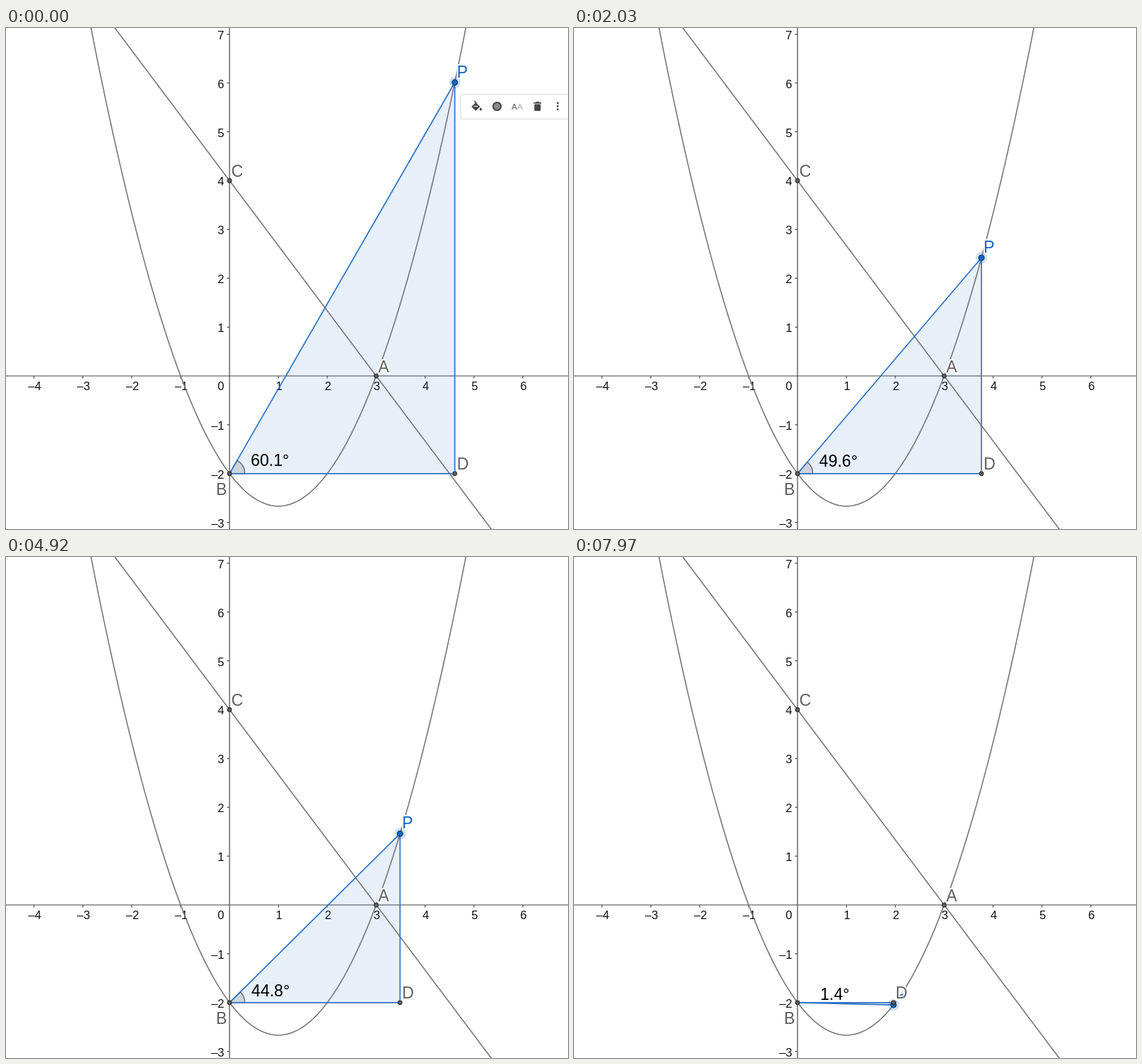
Recreate the animation shown at these times as an HTML page with a canvas. Size 792 by 707 pixels, loop 8000 ms.

```html
<!DOCTYPE html>
<html lang="en">
<head>
<meta charset="utf-8">
<title>Parabola and right triangle</title>
<style>
html, body { margin: 0; width: 100%; height: 100%; overflow: hidden; background: #fff; }
canvas { display: block; }
</style>
</head>
<body>
<canvas id="stage" width="792" height="707"></canvas>
<script>
const ctx = document.getElementById('stage').getContext('2d');
const LOOP = 8000, UNIT = 68.9, OX = 315, OY = 491;
const GREY = '#616161', BLUE = '#1565c0';
const FONT = '"Liberation Sans", Arial, sans-serif';

const sx = x => OX + x * UNIT;
const sy = y => OY - y * UNIT;
const parabola = x => 2 / 3 * (x + 1) * (x - 3);

// Drag of P: first step, last step, number of steps, x reached
const START_X = 4.608;
const DRAG = [
  [240, 960, 7, 4.208], [1070, 1200, 2, 4.1186], [1320, 1790, 5, 3.875],
  [1920, 2030, 2, 3.7625], [2160, 2510, 4, 3.617], [2650, 3450, 8, 3.474],
  [4340, 4680, 4, 3.482], [4920, 5030, 2, 3.494], [5270, 5270, 1, 3.496],
  [5540, 5540, 1, 3.498], [6150, 6150, 1, 3.479], [6260, 6880, 6, 2.818],
  [6990, 7120, 2, 2.6244], [7230, 7230, 1, 2.575], [7370, 7470, 2, 2.37],
  [7610, 7970, 4, 1.9633]
];

function dragX(t) {
  let x = START_X;
  for (const [from, to, steps, end] of DRAG) {
    if (t < from) break;
    const gap = (to - from) / (steps - 1 || 1);
    const done = t >= to ? steps : Math.floor((t - from) / gap + 0.01) + 1;
    x += (end - x) * done / steps;
  }
  return x;
}

function path(points, color, width) {
  ctx.beginPath();
  points.forEach(([x, y]) => ctx.lineTo(x, y));
  ctx.strokeStyle = color;
  ctx.lineWidth = width;
  ctx.stroke();
}

function disc(x, y, r, fill, stroke, width = 1) {
  ctx.beginPath();
  ctx.arc(x, y, r, 0, 7);
  ctx.fillStyle = fill;
  ctx.fill();
  if (!stroke) return;
  ctx.strokeStyle = stroke;
  ctx.lineWidth = width;
  ctx.stroke();
}

function text(str, x, y, size, color, align = 'left', outline = false) {
  ctx.font = `${size}px ${FONT}`;
  ctx.textAlign = align;
  if (outline) {
    ctx.strokeStyle = '#fff';
    ctx.lineWidth = 4;
    ctx.strokeText(str, x, y);
  }
  ctx.fillStyle = color;
  ctx.fillText(str, x, y);
}

const label = (str, x, y, color = GREY) => text(str, x, y, 23, color, 'left', true);
const signed = n => n < 0 ? '–' + -n : '' + n;

function drawAxes() {
  const ink = '#444';
  path([[0, OY], [792, OY]], ink, 1.2);
  path([[OX, 0], [OX, 707]], ink, 1.2);
  for (let n = -4; n <= 7; n++) {
    if (!n) continue;
    if (n < 7) {
      path([[sx(n), OY], [sx(n), OY + 3.5]], ink, 1.2);
      text(signed(n), sx(n) + 1, 511, 16.5, '#111', 'center');
    }
    if (n > -4) {
      path([[OX - 3.5, sy(n)], [OX, sy(n)]], ink, 1.2);
      text(signed(n), 307.5, sy(n) + 7, 16.5, '#111', 'right');
    }
  }
  text('0', 307.5, 511, 16.5, '#111', 'right');
}

function drawCurves() {
  const curve = [];
  for (let x = -3; x <= 5; x += 0.05) curve.push([sx(x), sy(parabola(x))]);
  path(curve, '#777', 1.6);
  path([-3, 6].map(x => [sx(x), sy(4 - 4 / 3 * x)]), '#777', 1.6);
}

function drawAngle(angle) {
  const by = sy(-2);
  ctx.beginPath();
  ctx.moveTo(OX, by);
  ctx.arc(OX, by, 21.5, 0, -angle, angle > 0);
  ctx.closePath();
  ctx.fillStyle = 'rgba(0,0,0,.11)';
  ctx.fill();
  ctx.strokeStyle = '#666';
  ctx.lineWidth = 1.4;
  ctx.stroke();
}

function drawToolbar() {
  const ink = '#444';
  ctx.beginPath();
  ctx.roundRect(640.5, 93.5, 160, 35, 3);
  ctx.fillStyle = '#fff';
  ctx.fill();
  ctx.strokeStyle = '#dcdcdc';
  ctx.lineWidth = 1.2;
  ctx.stroke();

  // Paint bucket
  ctx.fillStyle = ink;
  ctx.fill(new Path2D('M656 111l6 -6 6 6 -5 5q-1 1 -2 0zM669 112q3.5 4.5 0 4.5t0 -4.5z'));
  path([[660, 103], [663, 106]], ink, 1.4);
  path([[659, 110.5], [665, 110.5]], '#fff', 1.2);

  disc(692, 110.5, 5.6, '#8a8a8a', ink, 2);
  text('A', 712.5, 115, 11.5, '#555');
  text('A', 720.5, 115, 11.5, '#aaa');

  // Bin
  ctx.fillStyle = ink;
  ctx.fillRect(743.5, 105, 11, 1.6);
  ctx.fillRect(746.5, 104, 5, 1.5);
  ctx.beginPath();
  ctx.roundRect(744.5, 107.5, 9, 9.5, 1.2);
  ctx.fill();

  for (const dy of [-4.5, 0, 4.5]) disc(777.5, 110.5 + dy, 1.4, ink);
}

function draw(t) {
  const x = dragX(t), px = sx(x), py = sy(parabola(x)), by = sy(-2);
  const angle = Math.atan2(parabola(x) + 2, x);
  const triangle = [[OX, by], [px, by], [px, py], [OX, by]];

  ctx.fillStyle = '#fff';
  ctx.fillRect(0, 0, 792, 707);
  ctx.lineJoin = 'round';
  drawAxes();

  ctx.beginPath();
  triangle.forEach(p => ctx.lineTo(...p));
  ctx.fillStyle = 'rgba(21,101,192,.1)';
  ctx.fill();
  drawAngle(angle);
  drawCurves();
  path(triangle, '#2f74c6', 1.7);

  disc(px, py, 8.2, 'rgba(21,101,192,.2)');
  disc(px, py, 3.9, BLUE, '#0b3766', 1.1);
  for (const [cx, cy] of [[sx(3), OY], [OX, by], [OX, sy(4)], [px, by]])
    disc(cx, cy, 2.8, GREY, '#2a2a2a', 1.1);

  label('A', 524.5, 485.5);
  label('B', 296, 659);
  label('C', 317.5, 210);
  label('P', px + 3, py - 7, BLUE);
  label('D', px + 3, by - 6);

  const degrees = Math.abs(angle * 180 / Math.PI).toFixed(1) + '°';
  text(degrees, 332 + 15 * Math.cos(angle / 2), 625.3 - 15 * Math.sin(angle / 2), 23, '#000');
  if (t < DRAG[0][0]) drawToolbar();
}

const begin = performance.now();
function frame() {
  draw((performance.now() - begin) % LOOP);
  requestAnimationFrame(frame);
}
frame();
</script>
</body>
</html>
```
